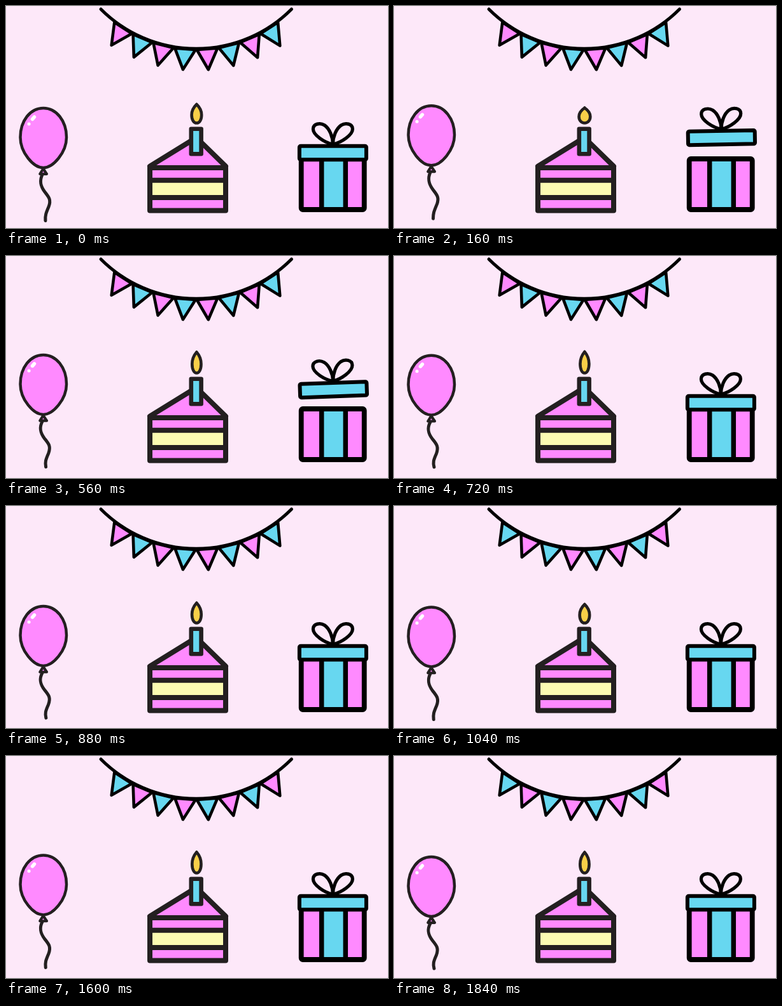
Recreate the animation shown at these times as an HTML page with a canvas. Size 600 by 350 pixels, loop 1.92 s.

```html
<!DOCTYPE html>
<html lang="en">
<head>
<meta charset="utf-8">
<title>Party loop</title>
<style>
html, body { margin: 0; width: 100%; height: 100%; overflow: hidden; background: #fde8f9; }
canvas { display: block; width: 600px; height: 350px; }
</style>
</head>
<body>
<canvas id="stage" width="600" height="350"></canvas>
<script>
const ctx = document.getElementById('stage').getContext('2d');
const LOOP = 1920, STEP = 80, TAU = Math.PI * 2;
const BG = '#fde8f9', PINK = '#ff8aff', CYAN = '#67d7f0', CREAM = '#fbfbb2',
      GOLD = '#f9cf48', INK = '#231f20', BLACK = '#000';

// Half sine wave between two times; skew moves its peak.
function hump(t, from, to, skew) {
  if (t <= from || t >= to) return 0;
  return Math.sin(Math.PI * ((t - from) / (to - from)) ** skew);
}

function shape(path, fill, stroke, width) {
  const p = typeof path === 'string' ? new Path2D(path) : path;
  if (fill) { ctx.fillStyle = fill; ctx.fill(p); }
  if (stroke) { ctx.strokeStyle = stroke; ctx.lineWidth = width; ctx.stroke(p); }
}

function box(x, y, w, h, fill, stroke, width, radius = 0) {
  const p = new Path2D();
  p.roundRect(x, y, w, h, radius);
  shape(p, fill, stroke, width);
}

function bunting(t) {
  const swap = t < LOOP / 2 ? 0 : 1, gap = .163;
  const at = (k, r) => `${298.7 + r * Math.sin(k * gap)} ${-144 + r * Math.cos(k * gap)}`;
  for (let k = -4; k < 4; k++) {
    shape(`M${at(k + .03, 213)}L${at(k + .97, 213)}L${at(k + .48, 245)}Z`,
      (k + swap) % 2 ? CYAN : PINK, BLACK, 4.6);
  }
  shape('M149 5A211 211 0 0 0 448.5 5', null, BLACK, 5);
}

function balloon(t) {
  const rise = 5.3 * hump(t, 0, 1200, .7) + 4.6 * hump(t, 1200, LOOP, 1.3);
  const s = .5 + .5 * Math.cos(TAU * (t - 200) / 1120);
  ctx.save();
  ctx.translate(0, -rise);
  shape(`M57 266C${51.5 + s} 276 ${53.5 + s} 284 ${60.5 + s / 2} 293`
    + `C67 301 ${70.5 + s} 305 ${66.5 + s} 316`
    + `C${62 + s} ${326 + s} ${61 + s / 2} 330 ${63 - 1.5 * s} ${337 + 2 * s}`, null, INK, 5);
  shape('M58.5 256.5L53.3 264.8H64Z', PINK, INK, 4.2);
  shape('M58.7 161C79 161 95 181 95 207C95 231 74 255 58.7 255'
    + 'C43 255 22.5 231 22.5 207C22.5 181 38 161 58.7 161Z', PINK, INK, 4.5);
  shape('M41.5 178.5L44.5 175', null, '#fff', 5.5);
  shape('M36 186L36.1 186', null, '#fff', 5);
  ctx.restore();
}

function flame(t) {
  const p = t % 1040;
  const drop = 12 * hump(p, 0, 480, 1.71) - 4.2 * hump(p, 480, 1040, .6);
  const x = 299.4, low = 184.5, top = 155 + drop, h = low - top;
  const w = 7.8 + drop * .2, mid = top + h * .57;
  const half = d => `M${x} ${top}C${x + d * .55} ${top + h * .14} ${x + d} ${mid - h * .22} ${x + d} ${mid}`
    + `C${x + d} ${mid + h * .27} ${x + d * .55} ${low} ${x} ${low}`;
  shape(half(w) + half(-w), GOLD, INK, 4.6);
}

function cake(t) {
  shape('M226 252.7L299 207.5L345 252.7', PINK, INK, 8);
  box(226, 255, 119, 67.5, PINK);
  box(226, 275, 119, 27, CREAM);
  box(226, 255, 119, 67.5, null, INK, 8);
  shape('M226 274.7H345M226 302H345', null, INK, 8);
  box(290.8, 193.8, 15.8, 39.4, CYAN, INK, 6.6);
  flame(t);
}

function gift(t) {
  box(463.7, 241, 99, 80, PINK);
  box(495.5, 241, 38, 80, CYAN);
  shape('M495.7 241V321M533.3 241V321', null, BLACK, 7.5);
  box(463.7, 241, 99, 80, null, BLACK, 7.8, 2.5);

  const lift = 34.2 * hump(t, 0, 720, .93);
  const tilt = 2 * Math.cos(TAU * (t - 320) / 480) * Math.min(1, lift / 20);
  ctx.save();
  ctx.translate(513.4 + lift * .04, 231.5 - lift);
  ctx.rotate(tilt * Math.PI / 180);
  box(-52.5, -10.7, 105, 21.4, CYAN, BLACK, 6, 2);
  const bow = 'M0 -13.5C-13 -16 -31 -28 -31 -37.5C-31 -46 -20 -48 -13 -43.5C-5 -38 0 -25 0 -13.5';
  shape(bow, null, BLACK, 5.2);
  ctx.scale(-1, 1);
  shape(bow, null, BLACK, 5.2);
  ctx.restore();
}

function draw(now) {
  const t = Math.floor((now % LOOP) / STEP) * STEP;
  ctx.fillStyle = BG;
  ctx.fillRect(0, 0, 600, 350);
  ctx.lineJoin = ctx.lineCap = 'round';
  bunting(t);
  balloon(t);
  cake(t);
  gift(t);
}

let start = null;
function tick(now) {
  if (start === null) start = now;
  draw(now - start);
  requestAnimationFrame(tick);
}
draw(0);
requestAnimationFrame(tick);
</script>
</body>
</html>
```
